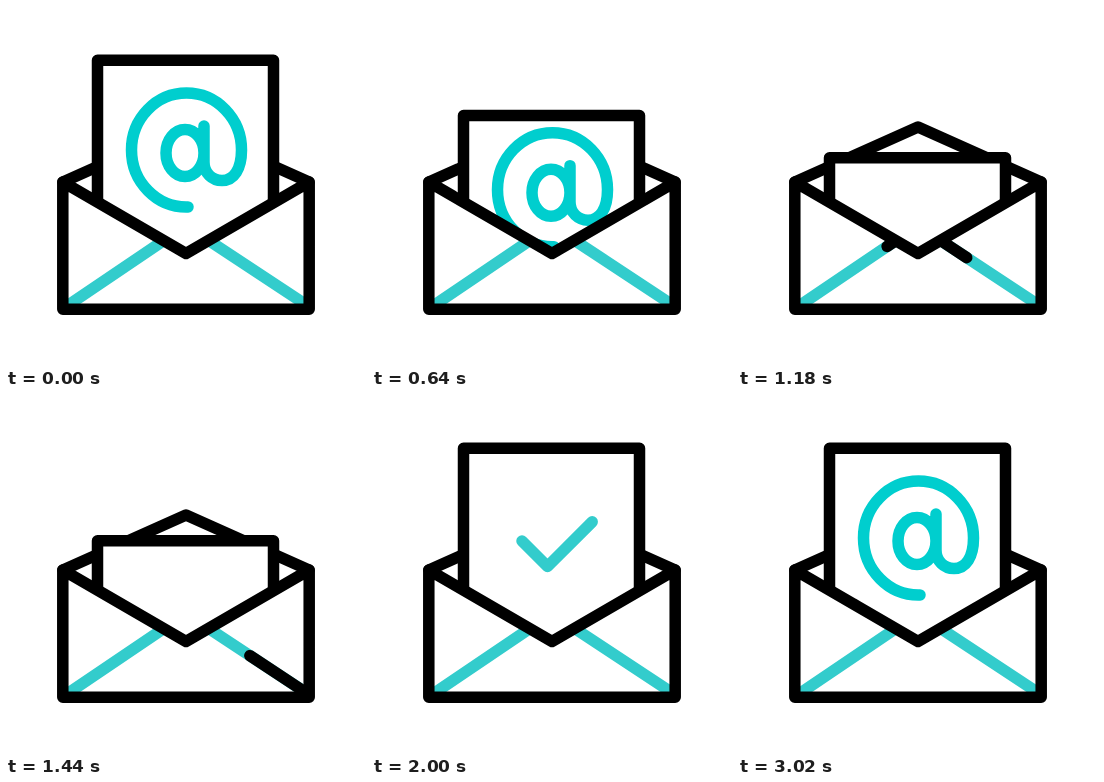
An HTML page that plays this animation: 360x360 px, repeating every 3.6 s.

```html
<!DOCTYPE html>
<html lang="en">
<head>
<meta charset="utf-8">
<title>Mail</title>
<style>
  html, body { margin: 0; width: 100%; height: 100%; overflow: hidden; background: #fff; }
  svg { display: block; width: 100%; height: 100%; }
  path { fill: none; stroke-width: 11.500; stroke-linecap: round; stroke-linejoin: round; }
  .ink { stroke: #000; }
  .teal { stroke: #3cc; }
  #at { stroke: #00cece; }
  #paper { fill: #fff; }
</style>
</head>
<body>
<svg viewBox="0 0 360 360">
  <clipPath id="pocket"><path d="M57 0H303V176L180 247.500L57 176Z"/></clipPath>
  <path class="ink" d="M57 176L180 121L303 176"/>
  <path class="teal" d="M58 302L180 219.500L302 300"/>
  <path class="ink" id="fold" pathLength="1" d="M58 302L180 219.500L302 300"/>
  <g clip-path="url(#pocket)">
    <path class="ink" id="paper" d="M91.500 400V54.200H267.500V400"/>
    <path id="at" pathLength="1" d="M198 120V147A19 23.500 0 0 1 160 147A19 23.500 0 0 1 198 147V156C198 167 206 174.500 216 174.500C228 174.500 235.500 163 235.500 144A55 57 0 0 0 125.500 144A55 57 0 0 0 182 201"/>
    <path class="teal" id="check" pathLength="1" d="M150 147L175.500 172.500L220.500 127.500"/>
  </g>
  <path class="ink" d="M56.800 176V303.200H303.200V176L180 247.500Z"/>
</svg>
<script>
const LOOP = 3600;
const get = id => document.getElementById(id);
const [fold, paper, at, check] = ["fold", "paper", "at", "check"].map(get);

const span = (t, from, to) => Math.min(1, Math.max(0, (t - from) / (to - from)));
const cubic = u => u < .5 ? 4 * u ** 3 : 1 - 4 * (1 - u) ** 3;
const smooth = u => u * u * (3 - 2 * u);

// Shows only the part of a path between two fractions of its length.
function trim(path, from, to) {
  path.style.visibility = to - from > .0005 ? "visible" : "hidden";
  path.setAttribute("stroke-dasharray", `${to - from} 2`);
  path.setAttribute("stroke-dashoffset", -from);
}

const drop = (path, y) => path.setAttribute("transform", `translate(0 ${y})`);

function draw(t) {
  drop(paper, 97.6 * (cubic(span(t, 314, 939)) - cubic(span(t, 1295, 1920))));
  trim(fold, span(t, 930, 1600), span(t, 715, 1380));
  trim(check, smooth(span(t, 2220, 2700)), smooth(span(t, 1530, 2020)));

  const leaving = t < 1300;
  drop(at, leaving ? 168 * cubic(span(t, 268, 1226)) : 0);
  trim(at, 0, leaving ? 1 : smooth(span(t, 2580, 3010)));
}

const start = performance.now();
function tick() {
  draw((performance.now() - start) % LOOP);
  requestAnimationFrame(tick);
}
draw(0);
requestAnimationFrame(tick);
</script>
</body>
</html>
```
